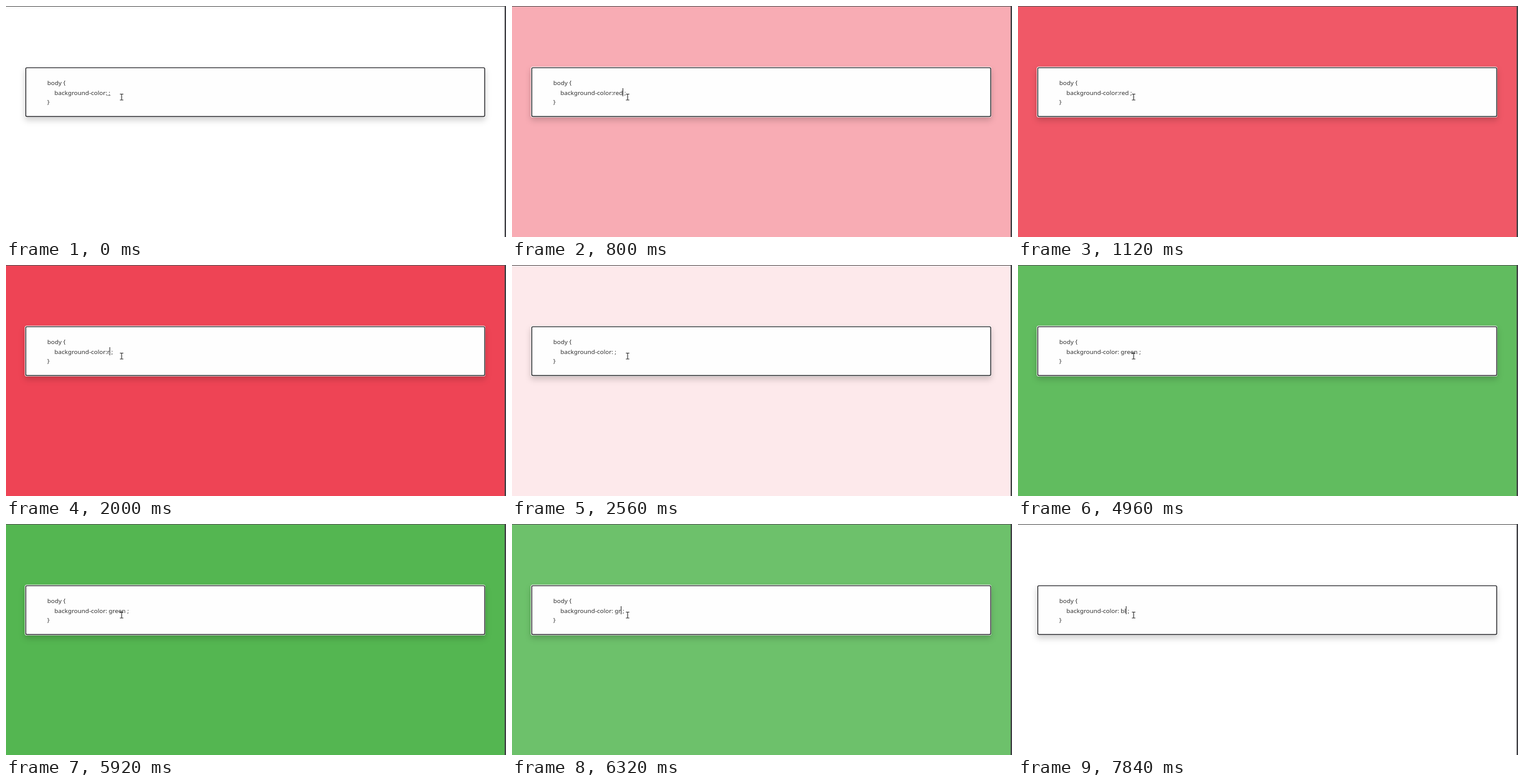
Write an HTML page that moves like this. It is 800x371 px and loops after 8 s.

```html
<!DOCTYPE html>
<html lang="en">
<head>
<meta charset="utf-8">
<title>Live CSS editor</title>
<style>
  html, body { margin: 0; width: 100%; height: 100%; overflow: hidden; }
  svg { display: block; width: 100vw; height: 100vh; }
  text { font: 9.8px "Noto Sans", "Open Sans", sans-serif; fill: #333; white-space: pre; }
  .card { filter: drop-shadow(0 5px 5px rgba(0, 0, 0, .17)); }
</style>
</head>
<body>
<svg viewBox="0 0 800 371" preserveAspectRatio="none">
  <rect id="page" width="800" height="371" fill="#fff"/>
  <g class="card">
    <rect x="30" y="97.5" width="737" height="81.5" rx="3.5" fill="#fff"/>
  </g>
  <rect x="31.6" y="99.1" width="734.3" height="78.4" rx="2" fill="#fefefe" stroke="#29292c" stroke-width="1.4"/>
  <text x="66" y="127.4">body {</text>
  <text id="rule" x="77.5" y="143"></text>
  <text x="66" y="158.4">}</text>
  <path id="underline" d="M160.5 143.4H167.5" stroke="#777" stroke-width=".8"/>
  <rect id="caret" y="132" width="1" height="13" fill="#222"/>
  <path d="M182.3 141.5H184.3L185 142L185.7 141.5H187.7M185 142V150.5M182.3 151H184.3L185 150.5L185.7 151H187.7"
        fill="none" stroke="#2a2a2a" stroke-width="1.1"/>
  <path d="M0 .5H800" stroke="#555"/>
  <path d="M798.9 0V371" stroke="#404044" stroke-width="2.2"/>
</svg>
<script>
const LOOP = 8000, BLINK = 500, FADE = 1000;
const PROPERTY = 'background-color:';
const WHITE = [255, 255, 255], RED = [238, 63, 81], GREEN = [84, 182, 81];

// Each keystroke: time and the value it leaves in the editor.
const keys = [
  [0, ''], [80, 'r'], [320, 're'], [480, 'red'],
  [1900, 're'], [1960, 'r'], [2040, ''],
  [3200, ' '], [3280, ' g'], [3440, ' gr'], [3760, ' gre'], [3920, ' gree'], [4240, ' green'],
  [6130, ' gree'], [6210, ' gre'], [6290, ' gr'], [6370, ' g'], [6440, ' '],
  [7680, ' b'], [7840, ' bl']
];

const fades = [
  [540, WHITE, RED], [1960, RED, WHITE],
  [4300, WHITE, GREEN], [6190, GREEN, WHITE]
];

const [page, rule, underline, caret] =
  ['page', 'rule', 'underline', 'caret'].map(id => document.getElementById(id));

const bezier = (u, a, b) => 3 * u * (1 - u) ** 2 * a + 3 * u * u * (1 - u) * b + u ** 3;

// The CSS "ease" curve.
function ease(x) {
  if (x <= 0 || x >= 1) return x <= 0 ? 0 : 1;
  let low = 0, high = 1;
  for (let i = 0; i < 24; i++) {
    const mid = (low + high) / 2;
    if (bezier(mid, .25, .25) < x) low = mid; else high = mid;
  }
  return bezier(low, .1, 1);
}

const latest = (list, t) => list.filter(([start]) => start <= t).pop();

function pageColor(t) {
  const fade = latest(fades, t);
  if (!fade) return WHITE;
  const [start, from, to] = fade;
  const k = ease((t - start) / FADE);
  return from.map((c, i) => Math.round(c + (to[i] - c) * k));
}

function render(t) {
  const [pressed, value] = latest(keys, t);
  const typed = PROPERTY + value;
  const line = typed + ' ;';
  if (rule.textContent !== line) rule.textContent = line;

  const idle = t < keys[1][0];
  const visible = !idle && Math.floor((t - pressed) / BLINK) % 2 === 0;
  caret.setAttribute('x', 77.5 + rule.getSubStringLength(0, typed.length) - .3);
  caret.setAttribute('visibility', visible ? 'visible' : 'hidden');
  underline.setAttribute('visibility', idle ? 'visible' : 'hidden');
  page.setAttribute('fill', `rgb(${pageColor(t)})`);
}

const begin = performance.now();
function tick() {
  render((performance.now() - begin) % LOOP);
  requestAnimationFrame(tick);
}
tick();
</script>
</body>
</html>
```
